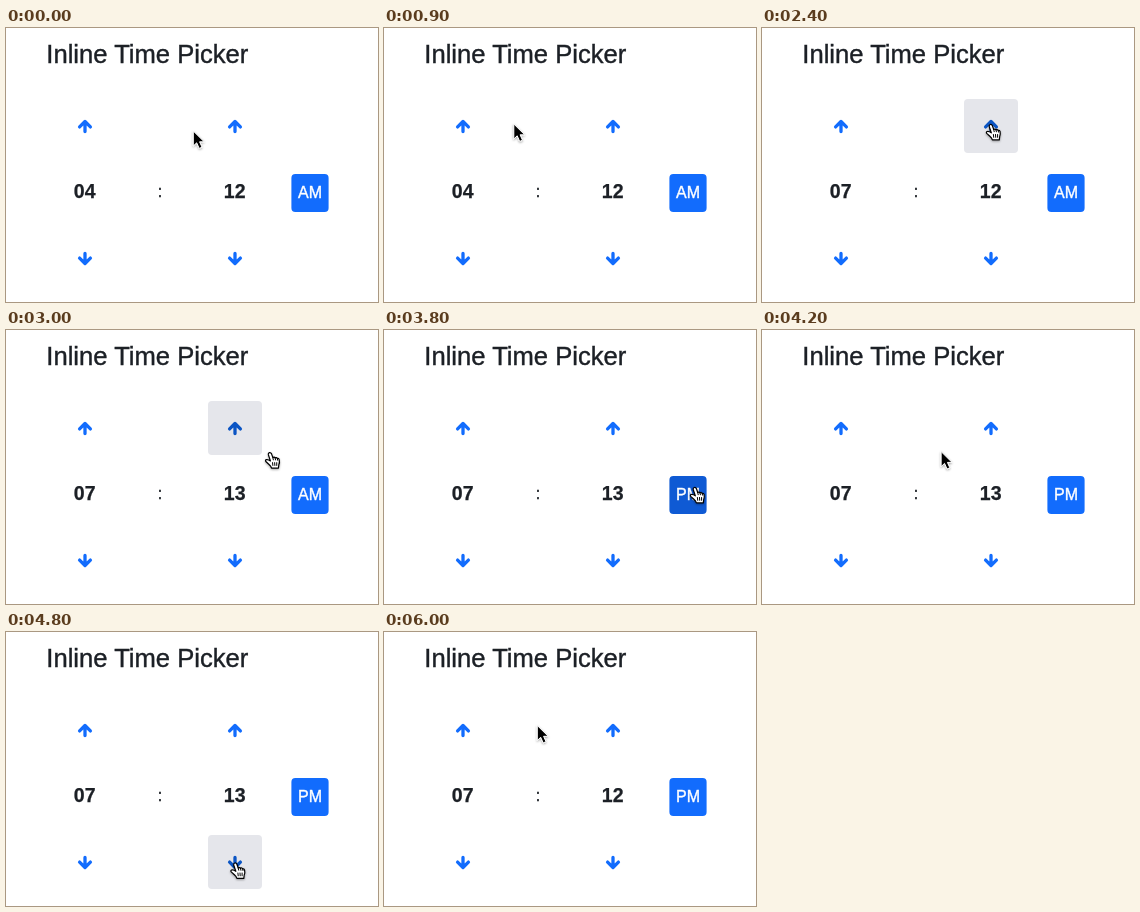
An HTML page for the animation above (7400 ms loop, 372 by 274 pixels).

```html
<!DOCTYPE html>
<html lang="en">
<head>
<meta charset="utf-8">
<title>Inline Time Picker</title>
<style>
  html, body { margin: 0; width: 100%; height: 100%; overflow: hidden; background: #fff; }
  svg { display: block; width: 372px; height: 274px; }
  text {
    font: 16px "Liberation Sans", Arial, sans-serif; text-anchor: middle;
    fill: #1c2026; stroke: #1c2026; stroke-width: 0.4;
  }
  .title { font-size: 25.6px; text-anchor: start; }
  .digits { font-size: 19.5px; font-weight: bold; stroke-width: 0.25; }
  .pad { fill: none; }
  .icon { fill: none; stroke: #126cfd; stroke-width: 3.3; stroke-linecap: round; stroke-linejoin: round; }
  .hover .pad { fill: #e5e6eb; }
  .hover .icon { stroke: #0b55c4; }
  .toggle { fill: #126cfd; }
  .hover .toggle { fill: #0f5ad4; }
  #period text { fill: #fff; stroke: #fff; }
</style>
</head>
<body>
<svg viewBox="0 0 372 274">
  <defs>
    <filter id="shadow" x="-50%" y="-50%" width="200%" height="200%">
      <feDropShadow dx="0" dy="1" stdDeviation="0.8" flood-opacity="0.35"/>
    </filter>
  </defs>
  <text class="title" x="40.3" y="35">Inline Time Picker</text>
  <g id="steppers"></g>
  <text id="hour" class="digits" x="78.7" y="170"></text>
  <text x="154" y="169">:</text>
  <text id="minute" class="digits" x="228.7" y="170"></text>
  <g id="period">
    <rect class="toggle" x="285.4" y="146" width="37.2" height="38" rx="4"/>
    <text x="304" y="170"></text>
  </g>
  <g id="cursor" filter="url(#shadow)">
    <path id="pointer" d="M.3 1V16L3.7 12.8L6.2 18.4L9 17.2L6.6 11.8H11.2Z"
      fill="#000" stroke="#fff" stroke-width="1"/>
    <g id="hand" stroke="#000" stroke-width="1.2" stroke-linecap="round" stroke-linejoin="round">
      <path fill="#fff" d="M-.2 8.3L-2.3 2Q-2.6 .3 -1.2 0T.9 1.2L2.2 5Q3.6 4 4.5 5.3Q6 4.4 6.7 5.9
        Q8.2 5.4 8.6 7.2Q9.2 10 8.2 12L7.8 15.4H.9Q.2 13.4 -1.6 11.8L-4.8 8.9Q-5.6 7.6 -4.4 7Q-2.6 6.5 -.2 8.3Z"/>
      <path fill="none" stroke-width="1" d="M2.2 5L2.7 7.2M4.5 5.3L4.9 7.3M6.7 5.9L7 7.6M1.9 10L2.2 12.8M4 10L4.2 12.8M6.1 10V12.8"/>
    </g>
  </g>
</svg>
<script>
  const LOOP = 7400, TICK = 100;
  const byId = id => document.getElementById(id);

  // Each move starts where the last one ended; bend pulls the curve sideways
  const origin = { x: 187, y: 102 };
  const moves = [
    { from: 600, to: 1200, x: 72, y: 88 },
    { from: 1900, to: 2400, x: 229.5, y: 96.5, bend: 174 },
    { from: 2700, to: 3400, x: 311.5, y: 157.5 },
    { from: 3900, to: 4400, x: 232, y: 96, bend: -177 },
    { from: 4400, to: 4750, x: 230, y: 231 },
    { from: 5300, to: 5700, x: 153, y: 92.5 }
  ];

  const buttons = [{ node: byId("period"), x: 285, y: 146, size: 38 }];

  function addStepper(x, y, dir) {
    const node = document.createElementNS("http://www.w3.org/2000/svg", "g");
    node.innerHTML = `<rect class="pad" x="${x}" y="${y}" width="54" height="54" rx="4"/>
      <path class="icon" transform="translate(${x + 27} ${y + 27.5}) scale(1 ${dir})"
        d="M-5.4 .4L0 -5L5.4 .4M0 -4.5V5"/>`;
    byId("steppers").append(node);
    buttons.push({ node, x, y, size: 54 });
  }
  for (const x of [52, 202]) {
    addStepper(x, 71, 1);
    addStepper(x, 203, -1);
  }

  function positionAt(t) {
    let { x, y } = origin;
    for (const m of moves) {
      if (t <= m.from) break;
      const k = Math.min(1, (t - m.from) / (m.to - m.from));
      x += (m.x - x) * k + 2 * k * (1 - k) * (m.bend || 0);
      y += (m.y - y) * k;
    }
    return { x, y };
  }

  const contains = (b, p) =>
    p.x >= b.x && p.x <= b.x + b.size && p.y >= b.y && p.y <= b.y + b.size;

  function draw(t) {
    const { x, y } = positionAt(t);
    // Hover feedback trails the cursor by one tick
    const trail = positionAt(t - TICK);
    for (const b of buttons) b.node.classList.toggle("hover", contains(b, trail));
    const hovering = buttons.some(b => contains(b, trail));

    const hour = 4 + [1400, 1600, 1900].filter(click => t >= click).length;
    const minute = t >= 2700 && t < 5100 ? 13 : 12;
    byId("hour").textContent = "0" + hour;
    byId("minute").textContent = minute;
    byId("period").lastElementChild.textContent = t >= 3800 ? "PM" : "AM";

    byId("cursor").setAttribute("transform", `translate(${x} ${y})`);
    byId("pointer").style.display = hovering ? "none" : "";
    byId("hand").style.display = hovering ? "" : "none";
  }

  const start = performance.now();
  function tick() {
    const t = (performance.now() - start) % LOOP;
    draw(Math.floor(t / TICK) * TICK);
    requestAnimationFrame(tick);
  }
  tick();
</script>
</body>
</html>
```
